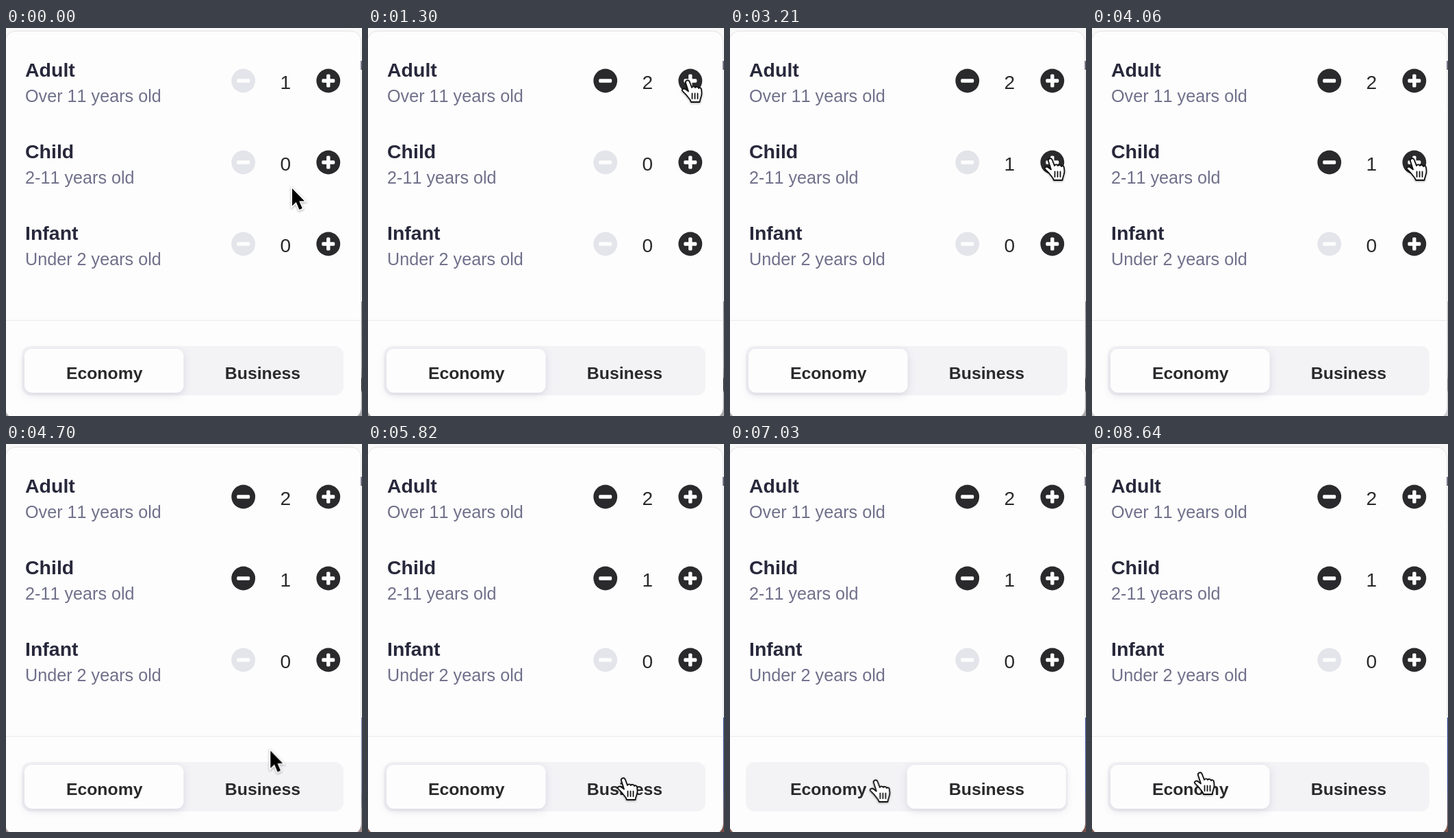
An HTML page for the animation above (8670 ms loop, 520x566 px).

```html
<!DOCTYPE html>
<html lang="en">
<head>
<meta charset="utf-8">
<title>Passenger picker</title>
<style>
  html, body { margin: 0; width: 100%; height: 100%; overflow: hidden; background: #f8f8f9; }
  svg { display: block; width: 520px; height: 566px; font-family: "Liberation Sans", Arial, sans-serif; font-kerning: none; }

  .name { font-size: 28.5px; font-weight: 700; fill: #28283c; }
  .note { font-size: 25.2px; fill: #70708b; }
  .count { font-size: 28px; fill: #2a2a2c; text-anchor: middle; }
  .tab { font-size: 24.8px; font-weight: 700; fill: #2a2a2c; text-anchor: middle; }
  .dark { fill: #2a2a2c; }
  .off { fill: #e4e4eb; }
  .sign { fill: #fdfdfd; }

  .anim { animation: 8670ms linear infinite both; }

  /* Counters and their minus buttons */
  .adult .before { animation-name: adult-before; animation-timing-function: step-end; }
  .adult .after { animation-name: adult-after; animation-timing-function: step-end; }
  .adult .minus { animation-name: adult-minus; }
  .child .before { animation-name: child-before; animation-timing-function: step-end; }
  .child .after { animation-name: child-after; animation-timing-function: step-end; }
  .child .minus { animation-name: child-minus; }
  @keyframes adult-before { 0% { opacity: 1 } 10.15%, 100% { opacity: 0 } }
  @keyframes adult-after { 0% { opacity: 0 } 10.15%, 100% { opacity: 1 } }
  @keyframes child-before { 0% { opacity: 1 } 37.02%, 100% { opacity: 0 } }
  @keyframes child-after { 0% { opacity: 0 } 37.02%, 100% { opacity: 1 } }
  @keyframes adult-minus { 0%, 10.15% { fill: #e4e4eb } 12.92%, 100% { fill: #2a2a2c } }
  @keyframes child-minus { 0%, 37.02% { fill: #e4e4eb } 39.79%, 100% { fill: #2a2a2c } }

  /* Selected tab */
  .pill { fill: #fdfdfd; filter: drop-shadow(0 3px 6px rgba(50, 50, 110, .15)); animation-name: pill; }
  @keyframes pill {
    0%, 67.47% { transform: translateX(0); animation-timing-function: ease-in-out }
    70.93%, 90.54% { transform: translateX(231.5px); animation-timing-function: ease-in-out }
    94%, 100% { transform: translateX(0) }
  }

  /* Page showing past the panel edge */
  .veil { animation-name: veil; }
  .blue { animation-name: blue; }
  @keyframes veil { 0%, 37% { opacity: 0 } 45%, 100% { opacity: .6 } }
  @keyframes blue { 0%, 47% { opacity: 0 } 62%, 100% { opacity: 1 } }

  /* Pointer */
  .pointer { animation-name: move; }
  .arrow { animation-name: arrow; animation-timing-function: step-end; }
  .hand { animation-name: hand; animation-timing-function: step-end; }
  @keyframes move {
    0%, .35% { transform: translate(417px, 232px); animation-timing-function: cubic-bezier(.37, 0, .63, 1) }
    7.04%, 19.61% { transform: translate(466px, 76px); animation-timing-function: cubic-bezier(.37, 0, .63, 1) }
    29.99%, 46.83% { transform: translate(467px, 190px); animation-timing-function: cubic-bezier(.37, 0, .63, 1) }
    56.63%, 74.97% { transform: translate(372px, 487px); animation-timing-function: cubic-bezier(.4, 0, .7, .85) }
    81.08% { transform: translate(212px, 490px); animation-timing-function: cubic-bezier(.3, .5, .5, 1) }
    88.12%, 100% { transform: translate(157px, 479px) }
  }
  @keyframes arrow {
    0%, 22.31%, 48.56% { opacity: 1 }
    5.56%, 27.81%, 54.87%, 100% { opacity: 0 }
  }
  @keyframes hand {
    0%, 22.31%, 48.56% { opacity: 0 }
    5.56%, 27.81%, 54.87%, 100% { opacity: 1 }
  }
</style>
</head>
<body>
<svg viewBox="0 0 520 566">
  <defs>
    <linearGradient id="grey" x2="0" y2="1">
      <stop offset="0" stop-color="#85858c"/>
      <stop offset=".55" stop-color="#a5a5aa"/>
      <stop offset=".66" stop-color="#77777c"/>
      <stop offset=".68" stop-color="#1c1c1f"/>
      <stop offset=".77" stop-color="#1c1c1f"/>
      <stop offset=".8" stop-color="#b0b0b4"/>
      <stop offset="1" stop-color="#a5a5a9"/>
    </linearGradient>
    <linearGradient id="dusk" x2="0" y2="1">
      <stop offset="0" stop-color="#2c479c"/>
      <stop offset=".6" stop-color="#41579c"/>
      <stop offset=".85" stop-color="#6d5a62"/>
      <stop offset="1" stop-color="#7a4f45"/>
    </linearGradient>
    <g id="bar"><rect x="-9.5" y="-2.7" width="19" height="5.4" rx="1.6"/></g>
    <g id="add">
      <circle class="dark" r="17.4"/>
      <g class="sign"><use href="#bar"/><use href="#bar" transform="rotate(90)"/></g>
    </g>
  </defs>

  <rect width="520" height="566" fill="#f8f8f9"/>
  <rect y="399" width="520" height="167" fill="url(#grey)"/>
  <rect class="anim veil" y="399" width="520" height="167" fill="#e6e6e9"/>
  <rect class="anim blue" y="399" width="520" height="167" fill="url(#dusk)"/>
  <path d="M515 113.5H520" stroke="#dcdce0"/>

  <rect x="-1" y="4.5" width="519.5" height="565" rx="15" fill="#fdfdfd" stroke="#e3e3e6"/>
  <path d="M519 48V60H520" fill="none" stroke="#55556a" stroke-width="1.6"/>
  <path d="M0 426.5H518" stroke="#eaeaed"/>

  <g class="adult">
    <text class="name" x="28" y="71">Adult</text>
    <text class="note" x="28" y="108">Over 11 years old</text>
    <g transform="translate(346.7 77)"><circle class="off anim minus" r="17.4"/><use class="sign" href="#bar"/></g>
    <text class="count anim before" x="408.3" y="89">1</text>
    <text class="count anim after" x="408.3" y="89">2</text>
    <use href="#add" x="470.8" y="77"/>
  </g>

  <g class="child" transform="translate(0 119)">
    <text class="name" x="28" y="71">Child</text>
    <text class="note" x="28" y="108">2-11 years old</text>
    <g transform="translate(346.7 77)"><circle class="off anim minus" r="17.4"/><use class="sign" href="#bar"/></g>
    <text class="count anim before" x="408.3" y="89">0</text>
    <text class="count anim after" x="408.3" y="89">1</text>
    <use href="#add" x="470.8" y="77"/>
  </g>

  <g transform="translate(0 238)">
    <text class="name" x="28" y="71">Infant</text>
    <text class="note" x="28" y="107.5">Under 2 years old</text>
    <g transform="translate(346.7 77)"><circle class="off" r="17.4"/><use class="sign" href="#bar"/></g>
    <text class="count" x="408.3" y="89">0</text>
    <use href="#add" x="470.8" y="77"/>
  </g>

  <rect x="23" y="464" width="470" height="72" rx="13" fill="#f3f3f6"/>
  <rect class="anim pill" x="27" y="468" width="232.5" height="64" rx="11"/>
  <text class="tab" x="143.7" y="512">Economy</text>
  <text class="tab" x="375" y="512">Business</text>

  <g class="anim pointer">
    <g style="filter: drop-shadow(0 1.5px 1.5px rgba(0, 0, 0, .35))">
      <path class="anim arrow" d="M1 2V27.5L6.8 22L11.4 33L15.8 31.1L11.2 20.4H19Z"
        stroke="#fff" stroke-width="3.6" paint-order="stroke"/>
      <g class="anim hand" stroke="#111" stroke-width="1.8" stroke-linecap="round" stroke-linejoin="round">
        <path fill="#fff" d="M-2 4C-3 1 1.500 -1.500 3.500 2L7 11C8 8.500 11.500 9 12 11C13 9 16.500 9.500 17 12C18 10.500 21 11 21 14L21.500 19C21.500 24 19 27 18.500 32H6C5 28 2 26 0 23C-2 20 -5 18 -7 15.500C-8 13 -4 11.500 -2 13.500L2 16.500Z"/>
        <path fill="none" d="M7.500 19.500V27M11.500 19.500V27M15.500 19.500V27"/>
      </g>
    </g>
  </g>
</svg>
</body>
</html>
```
